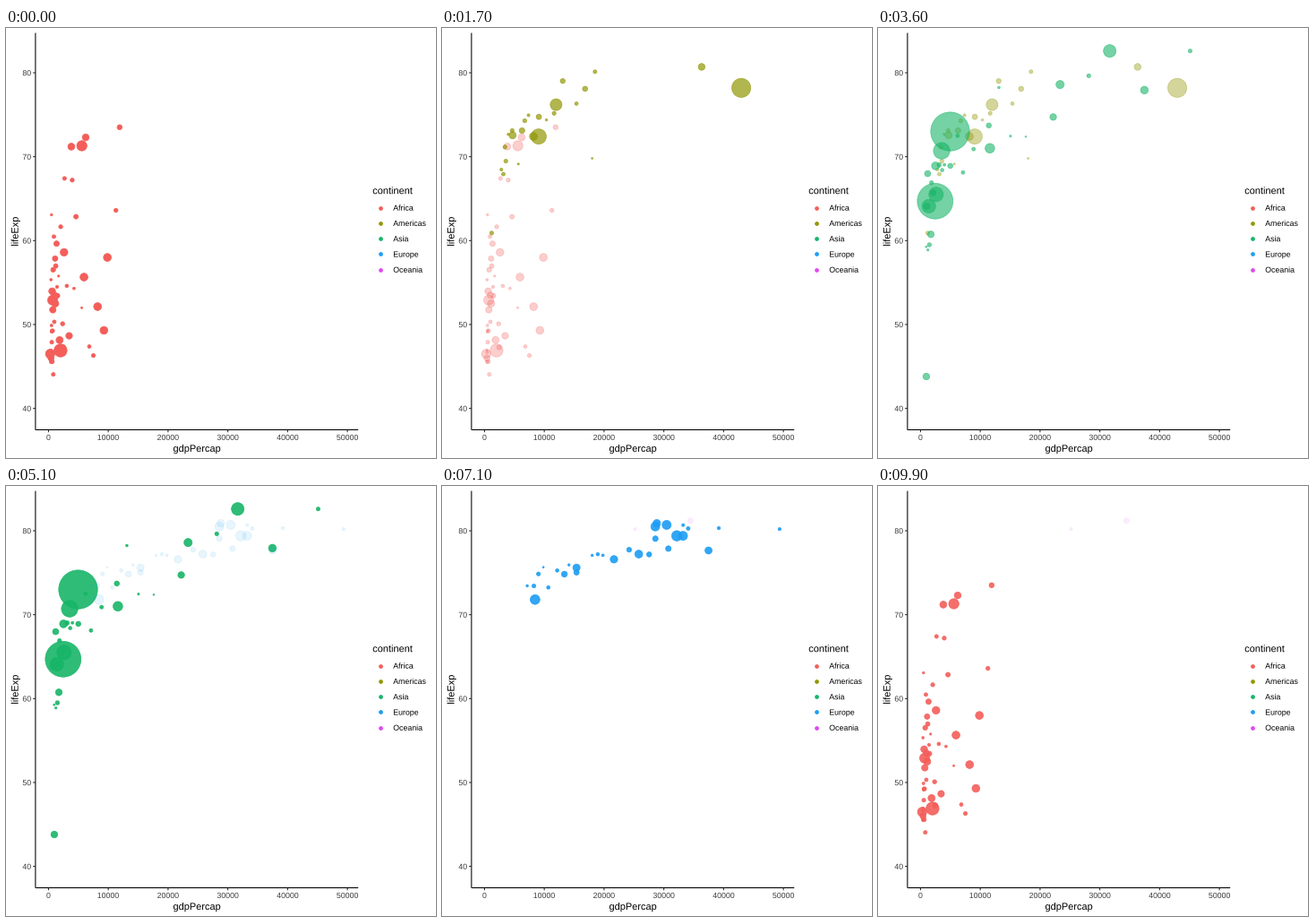
Animation of 480 by 480 pixels, one loop 10 s. Source, as a matplotlib script:

```python
import numpy as np
import matplotlib.pyplot as plt
from matplotlib.animation import FuncAnimation
from matplotlib.patches import PathPatch
from matplotlib.textpath import TextPath
from matplotlib.transforms import Affine2D

plt.rcParams["font.family"] = "Liberation Sans"

SIZE, DPI = 480, 72
LEFT, RIGHT, TOP, BOTTOM = 32.9, 393.2, 5.5, 448.5
FRAMES, INTERVAL = 100, 100
HOLD, FADE = 10, 10  # frames
SMALLEST, LARGEST = 0.2, 1319  # population in millions


def expanded(low, high):
    pad = 0.05 * (high - low)
    return low - pad, high + pad


INCOME = 278, 49357
LIFE = 39.6, 82.6
X_RANGE, Y_RANGE = expanded(*INCOME), expanded(*LIFE)


def cloud(seed, count, low, high, bend, base, slope, spread):
    """Random small countries: life expectancy grows with the log of income."""
    rng = np.random.default_rng(seed)
    t = (np.arange(count) + rng.random(count)) / count
    income = low * (high / low) ** (t ** bend)
    life = base + slope * np.log10(income / 1000) + rng.normal(0, spread, count)
    people = np.clip(rng.lognormal(2.1, 1.1, count), 0.3, 45)
    return np.column_stack([income, np.clip(life, *LIFE), people])


# Key countries (income, life expectancy, millions of people) and a cloud
CONTINENTS = [
    ("Africa", "#F35E5A",
     [(278, 46.5, 65), (691, 52.9, 76), (1107, 52.5, 38), (2014, 46.9, 135),
      (2602, 58.6, 42), (3820, 71.2, 34), (5581, 71.3, 80), (6223, 72.3, 33),
      (9270, 49.3, 44)],
     cloud(4, 43, 415, 13200, 1.6, 52.5, 6, 6)),
    ("Americas", "#929705",
     [(1202, 60.9, 8.5), (9066, 72.4, 190), (11978, 76.2, 109),
      (18009, 69.8, 1), (36319, 80.7, 33), (42952, 78.2, 301)],
     cloud(7, 19, 2700, 19300, 1.1, 66.5, 9.5, 1.8)),
    ("Asia", "#17B567",
     [(975, 43.8, 32), (1391, 64.1, 150), (4959, 73, 1319), (2452, 64.7, 1110),
      (3541, 70.7, 224), (2606, 65.5, 169), (11606, 71, 70),
      (23348, 78.6, 49), (31656, 82.6, 127)],
     cloud(2, 24, 944, 47300, 1.3, 62, 10.5, 2.5)),
    ("Europe", "#1B9DF4",
     [(8458, 71.8, 71), (15390, 75.6, 38), (28570, 80.5, 58),
      (28821, 80.9, 40), (30470, 80.7, 61), (32170, 79.4, 82),
      (33203, 79.4, 61), (49357, 80.2, 4.6)],
     cloud(5, 22, 5900, 41000, 0.7, 66, 8.8, 1.1)),
    ("Oceania", "#DF49EF",
     [(34435, 81.2, 20), (25185, 80.2, 4)], np.empty((0, 3))),
]


def to_x(value):
    return np.interp(value, X_RANGE, (LEFT, RIGHT))


def to_y(value):
    return np.interp(value, Y_RANGE, (BOTTOM, TOP))


def marker_area(size_mm):
    """Squared diameter of a disc whose size is given in millimetres."""
    return (0.75 * (size_mm * 72.27 / 25.4 + 0.945)) ** 2


def line(xs, ys, color):
    ax.plot(xs, ys, color=color, lw=1.07, solid_capstyle="butt", snap=False)


def label(x, y, text, size=8.8, color="black", align="left", angle=0):
    """Draw text as outlines, so that glyphs keep fractional positions."""
    path = TextPath((0, 0), text, size=size)
    box = path.get_extents()
    shift = {"left": 0, "center": (box.x0 + box.x1) / 2, "right": box.x1}[align]
    place = (Affine2D().translate(-shift, 0).scale(1, -1)
             .rotate_deg(-angle).translate(x, y))
    ax.add_patch(PathPatch(place.transform_path(path), fc=color, lw=0,
                           snap=False))


def dots(x, y, area, color):
    return ax.scatter(x, y, s=area, facecolors=color, edgecolors=color,
                      linewidths=0.71, zorder=3)


def bubbles(color, rows):
    income, life, people = rows.T
    share = np.clip((people - SMALLEST) / (LARGEST - SMALLEST), 0, 1)
    area = marker_area(0.1 + 19.9 * np.sqrt(share))
    return dots(to_x(income), to_y(life), area, color)


fig = plt.figure(figsize=(SIZE / DPI, SIZE / DPI), dpi=DPI, facecolor="white")
ax = fig.add_axes([0, 0, 1, 1])
ax.axis("off")

line([LEFT, LEFT], [TOP, BOTTOM], "black")
line([LEFT, RIGHT], [BOTTOM, BOTTOM], "black")
for tick in range(0, 50001, 10000):
    x = to_x(tick)
    line([x, x], [BOTTOM, BOTTOM + 2.75], "#262626")
    label(x, 460, str(tick), color="#3D3D3D", align="center")
for tick in range(40, 81, 10):
    y = to_y(tick)
    line([LEFT - 2.75, LEFT], [y, y], "#262626")
    label(27.8, y + 3.2, str(tick), color="#3D3D3D", align="right")
label(213.1, 473, "gdpPercap", 11, align="center")
label(13.6, 227, "lifeExp", 11, align="center", angle=90)

label(409.2, 185.2, "continent", 11)
for row, (name, color, *_) in enumerate(CONTINENTS):
    y = 200.5 + 17.28 * row
    dots([418.1], [y], marker_area(1.5), color)
    label(432.2, y + 3.2, name)

groups = [bubbles(color, np.vstack([keys, rest]))
          for _, color, keys, rest in CONTINENTS]
ax.set_xlim(0, SIZE)
ax.set_ylim(SIZE, 0)


def update(frame):
    current, step = divmod(frame, HOLD + FADE)
    mix = max(0, step - HOLD) / FADE
    opacity = [0.0] * len(groups)
    opacity[current] = 1 - mix
    opacity[(current + 1) % len(groups)] = mix
    for group, alpha in zip(groups, opacity):
        group.set_alpha(alpha)
        group.set_visible(alpha > 0)
    return groups


anim = FuncAnimation(fig, update, frames=FRAMES, interval=INTERVAL,
                     repeat=True, blit=False)
plt.show()
```
